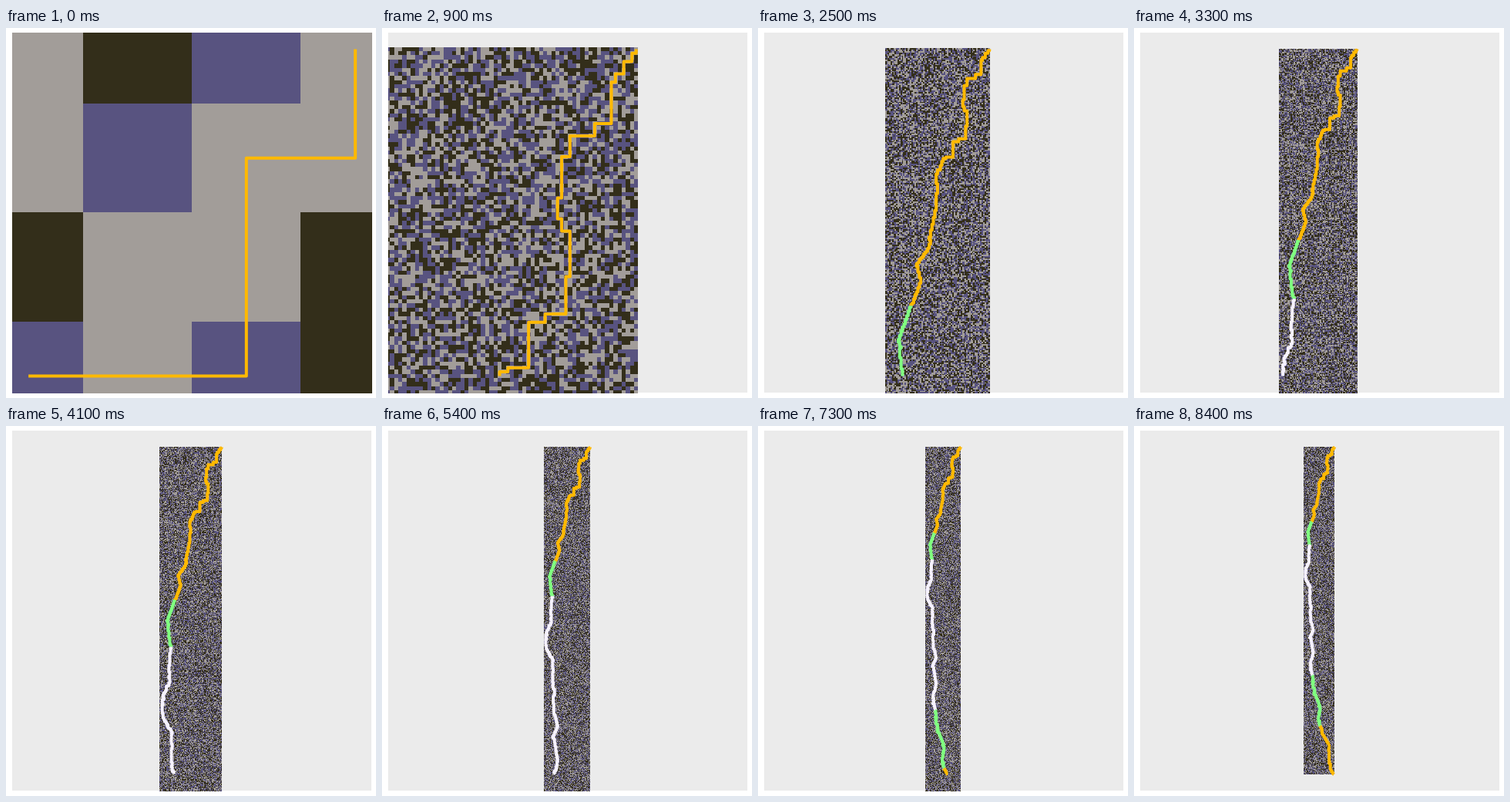
Recreate the animation shown at these times as an HTML page with a canvas. Size 480 px wide and 480 px high, loop 10 s.

```html
<!DOCTYPE html>
<html lang="en">
<head>
<meta charset="utf-8">
<title>Path through a random grid</title>
<style>
html, body { margin: 0; width: 100%; height: 100%; overflow: hidden; background: #fff; }
canvas { display: block; width: 480px; height: 480px; }
</style>
</head>
<body>
<canvas id="stage" width="480" height="480"></canvas>
<script>
const COLS = 75, ROWS = 800, LAST = 84, STEP = 100, LOOP = 10000;
const TOP = 27.4, SPAN = 424, MID = 241.15;
const CELLS = { g: [162, 157, 153], d: [51, 46, 26], p: [88, 83, 128] };
const CORNER = ['gdpg', 'gpgg', 'dggd', 'pgpd'];
const GOLD = '#ffb900', GREEN = '#80ff80', PALE = '#f6f2ff';

// Key points of the path: [row, column counted from the right edge].
const BENDS = [
  [0, 0], [1, -1], [3, -3], [6, -5], [8, -6], [18, -10], [21, -16], [26, -18], [36, -19],
  [41, -18], [44, -16], [55, -17], [64, -22], [66, -26], [77, -31], [78, -33],
  [90, -37], [112, -37], [141, -43], [153, -52], [165, -49], [182, -55], [208, -64],
  [240, -60], [280, -63], [300, -70], [323, -71], [341, -60], [425, -57], [447, -52],
  [464, -59], [502, -53], [537, -59], [562, -54], [600, -49], [635, -36], [668, -38],
  [702, -28], [728, -13], [787, -11], [799, -2]
];

let seed = 20231;
function rand() {
  seed = (seed + 0x6d2b79f5) | 0;
  let t = Math.imul(seed ^ (seed >>> 15), 1 | seed);
  t = (t + Math.imul(t ^ (t >>> 7), 61 | t)) ^ t;
  return ((t ^ (t >>> 14)) >>> 0) / 4294967296;
}
const pick = list => list[Math.floor(rand() * list.length)];

// Short gaps run straight down and then cut across; long ones slope.
function columnAt(row) {
  const i = BENDS.findIndex(([r]) => r >= row);
  const [a, from] = BENDS[i - 1], [b, to] = BENDS[i];
  const t = b - a > 11 ? (row - a) / (b - a) : row === b ? 1 : 0;
  return Math.round(from + (to - from) * t);
}

function buildPath() {
  const pts = [[0, 0]];
  let x = 0, wobble = 0;
  for (let y = 1; y < ROWS; y++) {
    pts.push([x, y]);
    if (y > 79 && rand() < 0.12) wobble = pick([-1, 0, 1]);
    const goal = Math.max(-71, columnAt(y) + wobble);
    while (x !== goal) pts.push([x += Math.sign(goal - x), y]);
  }
  return pts;
}

function buildGrid(path) {
  const cells = Array.from({ length: COLS * ROWS }, () => pick('gdp'));
  for (const [x, y] of path) {
    const i = y * COLS + COLS - 1 + x;
    if (cells[i] === 'd') cells[i] = pick('gp');
  }
  CORNER.forEach((row, y) =>
    [...row].forEach((c, x) => { cells[y * COLS + COLS - 4 + x] = c; }));

  const tile = document.createElement('canvas');
  tile.width = COLS;
  tile.height = ROWS;
  const g = tile.getContext('2d');
  const img = g.createImageData(COLS, ROWS);
  cells.forEach((c, i) => img.data.set([...CELLS[c], 255], i * 4));
  g.putImageData(img, 0, 0);
  return tile;
}

const path = buildPath();
const grid = buildGrid(path);
const ctx = document.getElementById('stage').getContext('2d');

// The path starts with 6 steps and has 38 more every 3 ticks until row 79,
// then grows evenly to its end.
const START = 6, TURN = 9;
const turnStep = path.findIndex(([, y]) => y === 80) - 1;
function stepsAt(tick) {
  const steps = tick < TURN
    ? START + (turnStep - START) * tick / TURN
    : turnStep + (path.length - 1 - turnStep) * (tick - TURN) / (LAST - TURN);
  return Math.round(steps);
}

function inkAt(row) {
  if (row < 183 || row >= 683) return GOLD;
  return row >= 239 && row < 559 ? PALE : GREEN;
}

function drawGrid(s, right) {
  const left = right - (COLS - 0.5) * s, top = TOP - s / 2;
  const c0 = Math.max(0, Math.floor((8 - left) / s));
  const rows = Math.min(ROWS, Math.ceil((474 - top) / s));
  ctx.save();
  ctx.beginPath();
  ctx.rect(8, 6, 467, 468);
  ctx.clip();
  ctx.imageSmoothingEnabled = false;
  ctx.drawImage(grid, c0, 0, COLS - c0, rows, left + c0 * s, top, (COLS - c0) * s, rows * s);
  ctx.restore();
}

function drawPath(s, right, pts) {
  const at = ([x, y]) => [right + x * s, TOP + y * s];
  ctx.lineWidth = 4;
  ctx.lineJoin = 'round';
  let ink = null;
  for (let i = 1; i < pts.length; i++) {
    const next = inkAt(pts[i - 1][1]);
    if (next !== ink) {
      if (ink) ctx.stroke();
      ctx.strokeStyle = ink = next;
      ctx.beginPath();
      ctx.moveTo(...at(pts[i - 1]));
    }
    ctx.lineTo(...at(pts[i]));
  }
  ctx.stroke();
}

// The view always fits the visible path and centres it sideways.
function draw(tick) {
  const pts = path.slice(0, stepsAt(tick) + 1);
  const min = Math.min(...pts.map(([x]) => x));
  const s = SPAN / Math.max(pts[pts.length - 1][1], -min);
  const right = MID - min / 2 * s;
  ctx.fillStyle = '#fff';
  ctx.fillRect(0, 0, 480, 480);
  ctx.fillStyle = '#ebebeb';
  ctx.fillRect(8, 6, 466, 467);
  drawGrid(s, right);
  drawPath(s, right, pts);
}

let shown = -1;
function loop() {
  const tick = Math.min(LAST, Math.floor(performance.now() % LOOP / STEP));
  if (tick !== shown) draw(shown = tick);
  requestAnimationFrame(loop);
}
loop();
</script>
</body>
</html>
```
